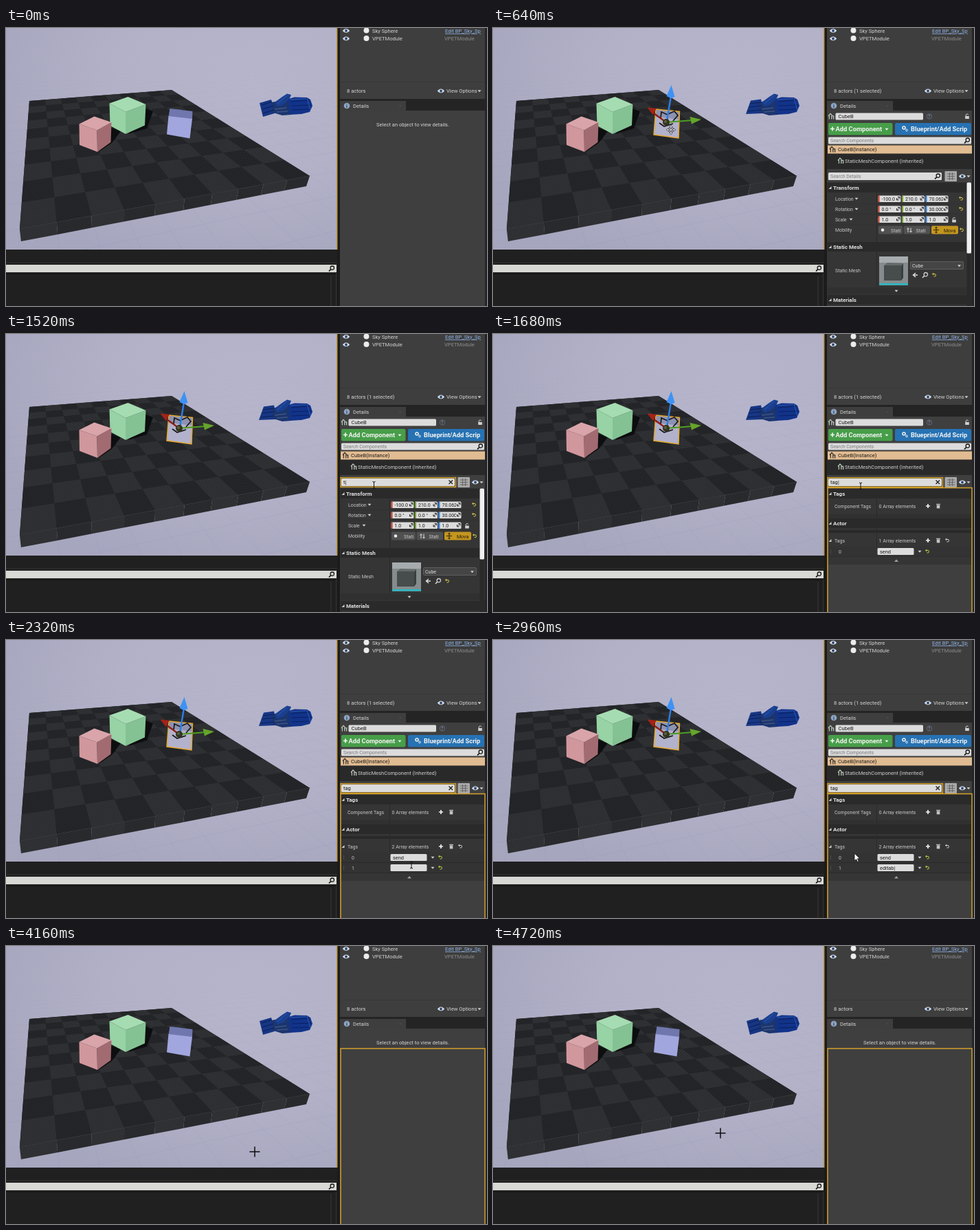
An HTML page for the animation above (4.8 s loop, 700x404 px).

```html
<!DOCTYPE html>
<html lang="en">
<head>
<meta charset="utf-8">
<title>Tagging a cube</title>
<style>
  html, body { margin: 0; width: 100%; height: 100%; overflow: hidden; background: #1e1e1e; }
  svg { display: block; width: 700px; height: 404px; }
  text { font: 7.6px Roboto, sans-serif; fill: #d4d4d4; white-space: pre; }
  .b { font-weight: 700; }
</style>
</head>
<body>
<svg id="stage" viewBox="0 0 700 404" xmlns="http://www.w3.org/2000/svg"></svg>
<script>
const LOOP = 4800, STEP = 80, SELECT = 640, FILTER = 1600, ADD = 2160, DESELECT = 4160;

// Markup helpers
const rect = (x, y, w, h, fill, more = '') => `<rect x="${x}" y="${y}" width="${w}" height="${h}" fill="${fill}" ${more}/>`;
const text = (x, y, s, fill = '#d4d4d4', size = 7.6, more = '') =>
  `<text x="${x}" y="${y}" style="fill:${fill};font-size:${size}px" ${more}>${s}</text>`;
const bold = (x, y, s, size = 8, fill = '#e2e2e2') => text(x, y, s, fill, size, 'class="b"');
const poly = (pts, fill, more = '') => `<polygon points="${pts}" fill="${fill}" ${more}/>`;
const path = (d, stroke, w = 1, fill = 'none') => `<path d="${d}" stroke="${stroke}" stroke-width="${w}" fill="${fill}"/>`;
const dot = (x, y, r, fill, more = '') => `<circle cx="${x}" cy="${y}" r="${r}" fill="${fill}" ${more}/>`;
const during = (from, to, s) => `<g data-from="${from}" data-to="${to}">${s}</g>`;
const at = (x, y, s) => `<g transform="translate(${x} ${y})">${s}</g>`;
const bySelection = (off, on) => during(0, SELECT, off) + during(SELECT, DESELECT, on) + during(DESELECT, LOOP, off);

// Small icons
const eye = (x, y) => at(x, y, path('M-5 0Q0-5.5 5 0Q0 5 -5 0Z', '#b9c6d8', .8, '#e4e8ee') + dot(0, 0, 1.9, '#2c4770'));
const lens = (x, y, c = '#161616') => at(x, y, dot(.8, -.8, 2.7, 'none', `stroke="${c}" stroke-width="1.3"`) + path('M-1.2 1.2L-4 4', c, 1.7));
const caret = (x, y, c = '#d0d0d0') => poly(`${x - 2.5},${y - 1.3} ${x + 2.5},${y - 1.3} ${x},${y + 1.7}`, c);
const undo = (x, y, c = '#d9c64a') => at(x, y, path('M-1.5-1.5H1Q2.5-1.5 2.5.2T1 2H-.5', c, 1) + poly('-3,-1.5 -.8,-3.4 -.8,.4', c));
const plus = (x, y) => path(`M${x - 3} ${y}h6M${x} ${y - 3}v6`, '#f2f2f2', 1.7);
const trash = (x, y) => rect(x - 2.3, y - 1.6, 4.6, 5, '#c4c4c4') + rect(x - 3, y - 3.2, 6, 1.1, '#c4c4c4');
const fold = (x, y) => poly(`${x + 4},${y - 4} ${x + 4},${y} ${x},${y}`, '#cfcfcf');
const house = (x, y, c = '#b9c7b9') => at(x, y, path('M-4-.5L-1-4L1.5-1.5M-2.6-1V4', c, 1.2) + path('M.8 4V-.6L3.6-.6V4', c, 1.3));
const lock = (x, y) => rect(x - 2.8, y - .5, 5.6, 4, '#d0d0d0') + path(`M${x - 1.8} ${y - .5}v-2q1.8-2.4 3.6 0`, '#d0d0d0', 1);
const field = (x, y, w, h) => rect(x, y, w, h, '#dcdcdc', 'rx="1.5"');

// Unit square to the floor's perspective
const project = (u, v) => {
  const w = 1 + .1347 * u - .5736 * v;
  return [(239.5 * u - 25.5 * v + 34) / w, (-3.9 * u + 18.5 * v + 106) / w].map(n => +n.toFixed(1));
};

function ground() {
  let d = '';
  for (let i = -20; i <= 30; i++) {
    const u = i / 10;
    d += `M${project(u, -1)}L${project(u, (.8 + .1347 * u) / .5736)}`;
  }
  for (let i = -10; i <= 16; i++) {
    const v = i / 10, near = Math.max(-2, (.5736 * v - .8) / .1347);
    d += `M${project(near, v)}L${project(3, v)}`;
  }
  return `<g mask="url(#fade)">${path(d, '#9498bd', .5)}</g>`;
}

function floor() {
  const n = 10, shade = odd => odd ? '#2b2c2f' : '#202124';
  let s = poly('34,106 241,90 442,215 20,292', '#26272a');
  for (let i = 0; i < n; i++) {
    for (let j = 0; j < n; j++) {
      const [a, b, c, d] = [i / n, (i + 1) / n, j / n, (j + 1) / n];
      s += poly([project(a, c), project(b, c), project(b, d), project(a, d)].join(' '), shade((i + j) % 2));
    }
    const drop = u => { const [x, y] = project(u, 1); return [x + 2 - 7 * u, y + 18 - 3 * u]; };
    const [a, b] = [i / n, (i + 1) / n];
    s += poly([project(a, 1), project(b, 1), drop(b), drop(a)].join(' '), i % 2 ? '#252629' : '#2c2d30');
  }
  return s + poly('34,106 241,90 442,215 437,230 22,310 20,292', 'url(#weave)') +
    path('M20 292L442 215', '#36373a', .7);
}

const cube = (top, left, right, [a, b, c]) => poly(left, b) + poly(right, c) + poly(top, a);

function cubes() {
  return poly('203,117 214,121 205,146 178,154', '#0c0d0e') + poly('153,145 167,150 154,167 135,180', '#0d0e0f') +
    cube('150.5,109.5 177.5,100 203.5,111 174,122', '150.5,109.5 174,122 174,154 151.5,142', '174,122 203.5,111 202,141.5 174,154',
      ['#a6dcb2', '#97d3a5', '#84c294']) +
    cube('106.5,139.5 128.5,128.5 153.5,137 132.5,148.5', '106.5,139.5 132.5,148.5 133,180 107,170', '132.5,148.5 153.5,137 152.5,166 133,180',
      ['#d9a5aa', '#d0979d', '#a26b72']);
}

function hand(cuff, ribs) {
  return poly(cuff, '#173684') +
    poly('386,108 398,106 413,103 415,126 402,127 389,123', '#1b356f') +
    poly('391,108 402,100 409,95.5 415,97 413,102 404,111 395,114', '#1a3f90') +
    poly('411,103 420,100.5 438,101 443,104 446,113 442,122 430,125 413,126', '#12338a') +
    path(ribs, '#0c2159', 1.2) +
    path('M415 107L441 105M416 113L444 112M416 119L441 118', '#0b2260', 1.2) +
    path('M414 104L437 102.5M395 110L409 98M438 102L443 119', '#2f59ab', 1) +
    path('M391 118L408 116M394 122L410 121', '#40547f', 1.3);
}
const restingHand = () => hand('369,109 386,104 391,124 374,129', 'M372 112L387 107M373 118L389 113M374 124L390 119');
const tiltedHand = () => hand('375,105.5 390,103.5 394,124 368,125', 'M374 110L390 108M372 115L391 113M370 121L391 119');

function gizmo() {
  return poly('237,118 271.5,121.5 270,160 234,155', '#b3b2cc') + poly('237,118 271.5,121.5 271,133 236,129', '#8e92b0') +
    poly('237,118 271.5,121.5 270,160 234,155', 'none', 'stroke="#e5a82c" stroke-width="1.5"') +
    path('M244 131L245 122L254 126V133M255 125L264 121L269 127L262 135M242 138L249 143L262 139', '#1a1a1c', 1.8) +
    path('M253 135L259 99', '#2b7fe8', 2.4) + poly('252.5,99 259.5,83 264.5,100 259,102', '#3d92f4') +
    path('M253 137L291 134', '#4f9a24', 2.2) + poly('286.5,129 303,133 289,139.5', '#65a52c') +
    path('M252 137L234 124', '#8f1c16', 2.2) + poly('224.5,115.5 238,117 232.5,126', '#a32319') +
    dot(252, 137, 5, '#33351f') + dot(251, 136, 2.2, '#5c5c3c');
}

const blueCube = () => poly('238.5,117 271.5,121 271,133 236.5,129', '#7077ae') + poly('236.5,128 271,132 267.5,160.5 234,154.5', '#a1a6de');

function viewport() {
  return `<g clip-path="url(#view)">` + rect(0, 0, 482, 322, 'url(#sky)') + ground() + floor() + cubes() +
    bySelection(blueCube() + restingHand(), gizmo() + tiltedHand()) + '</g>' +
    rect(481, 0, 1.7, 322, '#bf9537');
}

function browser() {
  return rect(0, 322, 482, 82, '#202020') + rect(0, 340, 482, 2, '#2a2a2a') + rect(0, 344, 481, 11, '#d8d8d5') + lens(474, 349.5) +
    rect(0, 357, 480, 1, '#151515') + rect(472.5, 360, 1, 44, '#383838') + rect(480, 357, 1, 47, '#343434');
}

function outliner() {
  return rect(482.7, 0, 3.3, 404, '#1b1b1b') + rect(486, 0, 211, 103, '#3e3e3e') + rect(697, 0, 3, 404, '#252525') +
    rect(486, 78, 211, 1, '#383838') +
    eye(495, 4) + eye(495, 15.5) + dot(524.5, 3.5, 4, '#ececec') + dot(524.5, 15, 4, '#ececec') +
    text(533, 7, 'Sky Sphere') + text(533, 18, 'VPETModule') + text(638, 18, 'VPETModule', '#8d8d8d') +
    `<g clip-path="url(#link)">${text(639, 7, 'Edit BP_Sky_Sp', '#8fb2e6', 7.6, 'text-decoration="underline"')}</g>` +
    bySelection(text(496, 94, '8 actors'), text(496, 94, '8 actors (1 selected)')) +
    eye(633, 91.5) + text(641, 94, 'View Options') + caret(689, 91.5) +
    rect(486, 103, 214, 17, '#242424') + rect(486, 106, 96, 14, '#3e3e3e') +
    dot(496, 113, 4.3, '#8fa6c4') + bold(495, 116, 'i', 7, '#1f3048') + text(505, 116, 'Details') + text(572, 115, '×', '#555', 6) +
    rect(486, 120, 211, 284, '#3f3f3f');
}

const hint = () => text(539, 143, 'Select an object to view details.');

function header(y, label) {
  return rect(487, y, 210, 14, '#2a2a2a') + fold(488.5, y + 9) + bold(495, y + 10, label);
}

function objectHead() {
  return house(492, 128.5) + field(498.5, 123.5, 127.5, 10) + text(502.5, 131, 'CubeB', '#1b1b1b') +
    dot(635, 128.5, 3.7, 'none', 'stroke="#5f6a80"') + text(633.2, 131, '?', '#8c9ab5', 6.5) + lock(690, 128.5) +
    rect(488, 138, 93.5, 17.5, '#479e49', 'rx="2"') + plus(494, 146.5) + bold(498.5, 150, 'Add Component', 9.3, '#f4f4f4') + caret(573, 147, '#f0f0f0') +
    rect(585, 138, 111, 17.5, '#2672b3', 'rx="2"') + dot(598, 145, 2, 'none', 'stroke="#eee" stroke-width="1.6"') +
    dot(602, 148.5, 1.4, 'none', 'stroke="#eee"') + bold(608, 150, 'Blueprint/Add Scrip', 9.3, '#f4f4f4') +
    field(488, 158.5, 208, 10) + text(491, 166, 'Search Components', '#7d7d7d', 7) + lens(690, 163.5) +
    rect(486, 170, 211, 35, '#292929') + rect(487, 170.5, 210, 12, '#e1bc92') + house(494, 176.5, '#33302c') +
    text(502, 179, 'CubeB(Instance)', '#1d1a16') + house(506, 193) + text(512, 196, 'StaticMeshComponent (Inherited)', '#cfcfcf') +
    rect(657.5, 208, 17.5, 15, '#a9a9a9', 'rx="1"') + path('M661 212h11M661 215.5h11M661 219h11M664.5 210v11M668.5 210v11', '#5a5a5a', .8) +
    eye(683, 215.5) + caret(692, 215.5) + field(488, 210, 165, 11);
}

function properties() {
  const rows = [['Location', 248, '-100.0', '210.0', '70.0625'], ['Rotation', 263, '0.0 °', '0.0 °', '30.000'], ['Scale', 278, '1.0', '1.0', '1.0']];
  const cells = rows.map(([name, y, ...vals]) =>
    text(498, y + 2.5, name, '#c9c9c9', 6.9) + caret(name === 'Scale' ? 521 : 529, y) +
    vals.map((v, i) => {
      const x = 560.5 + i * 34.5;
      return field(x, y - 4.5, 33, 9.5) + rect(x, y - 4.5, 2, 9.5, ['#c8402e', '#72a82e', '#2f7fd8'][i]) +
        text(x + 5, y + 2.6, v, '#1c1c1c', 7) + rect(x + 25.5, y - 4, 7, 8.5, '#dcdcdc') +
        path(`M${x + 27} ${y + 2}l4-4M${x + 27} ${y - 1}v3h3M${x + 28.5} ${y - 2.5}h3v3`, '#222', .9);
    }).join('')).join('');
  const button = (x, w, fill, label, ink) => rect(x, 287.5, w, 12, fill, 'rx="2"') + text(x + 18, 296.5, label, ink, 7);
  return rect(486, 224, 211, 180, '#353535') + header(225, 'Transform') + rect(558, 239, 1, 72, '#292929') + cells +
    path('M487 255.5h203M487 270.5h203M487 286h203', '#303030', .7) +
    undo(681, 248) + undo(681, 263) + lock(671, 279) + text(498, 296, 'Mobility', '#c9c9c9', 6.9) +
    button(561, 35, '#505050', 'Stati', '#c9c9c9') + button(597.5, 38.5, '#505050', 'Stati', '#c9c9c9') + button(638, 39, '#c4961f', 'Mova', '#241c08') +
    dot(567, 293.5, 2.3, '#eee') + path('M604 297v-6M608 290.5v6M602.5 292.5l1.5-2l1.5 2M606.5 295l1.5 2l1.5-2', '#ddd', 1) +
    path('M641 293.5h8M645 289.5v8M643.5 291l1.5-2l1.5 2M643.5 296l1.5 2l1.5-2', '#2c220a', 1) + undo(682, 293.5) +
    header(311, 'Static Mesh') + rect(558, 325, 1, 52, '#292929') + text(498, 354.5, 'Static Mesh', '#c9c9c9', 7) +
    rect(562, 332, 42, 42, '#868c8d') + rect(562, 332, 42, 9, '#a6acae') + poly('569,345 574,341 597,342 594,346', '#646a6a') +
    rect(569, 345, 25, 22, '#474d4d') + poly('594,346 597,342 597,363 594,367', '#393e3e') + rect(562, 371, 42, 2.5, '#27b9c4') +
    rect(607.5, 339.5, 77, 11, '#454545', 'rx="1.5" stroke="#686868" stroke-width=".8"') + text(610, 348, 'Cube', '#e4e4e4', 7) + caret(678.5, 345.5) +
    path('M618 359h-6M615 356l-3.5 3l3.5 3', '#ddd', 1.5) + lens(629, 359, '#ccc') + undo(642, 359) +
    rect(487, 377, 203, 10, '#303030') + caret(587, 382) + header(388, 'Materials') +
    rect(689.5, 225, 6.5, 179, '#2a2a2a') + rect(689.5, 224.5, 6.5, 103, '#f0f0f0', 'rx="1.5"');
}

function tagRow(y, index, id, value) {
  return rect(487, y - 7, 209, 15, '#333') + path(`M487 ${y + 7.5}h209`, '#282828', .7) + rect(491, y - 3, 1, 6, '#4b4b4b') +
    text(503, y + 2.7, index, '#c9c9c9', 7) + field(559.5, y - 5, 53, 10) + text(563, y + 2.7, value, '#1a1a1a', 7.4, id) +
    caret(621, y) + undo(632, y, '#b9c83c');
}

function tags() {
  const tools = y => plus(633, y) + trash(648, y);
  const folder = y => rect(487, y - 6, 209, 11, '#353535') + poly(`584,${y + 1.5} 590,${y + 1.5} 587,${y - 2}`, '#a0a0a0');
  const line = (x, y, s) => text(x, y, s, '#c9c9c9', 7);
  return rect(486, 224, 211, 180, '#3f3f3f') + rect(487, 224, 210, 111, '#353535') + header(225, 'Tags') +
    line(497, 252.5, 'Component Tags') + text(561.5, 252.5, '0 Array elements', '#c9c9c9', 7.2) + tools(250) + rect(487, 262, 210, 6, '#303030') +
    header(268, 'Actor') + rect(487, 285, 210, 4, '#292929') + rect(558, 225, 1, 109, '#2a2a2a') +
    fold(488.5, 302) + line(497, 302.5, 'Tags') + tools(300) + undo(661, 300, '#ccc') +
    tagRow(316, 0, '', 'send') +
    during(0, ADD, text(561.5, 302.5, '1 Array elements', '#c9c9c9', 7.2) + folder(329.5)) +
    during(ADD, LOOP, text(561.5, 302.5, '2 Array elements', '#c9c9c9', 7.2) + tagRow(331, 1, 'id="tag"', '') + folder(345));
}

function cursors() {
  const arms = 'M0-6.5L2.3-3.6H.8V-.8H3.6V-2.3L6.5 0L3.6 2.3V.8H.8V3.6H2.3L0 6.5L-2.3 3.6H-.8V.8H-3.6V2.3L-6.5 0L-3.6-2.3V-.8H-.8V-3.6H-2.3Z';
  const shapes = {
    cross: path('M-7.5 0h15M0-7.5v15', '#0c0c0c', 1.5),
    move: path(arms, '#111', .7, '#fff'),
    arrow: path('M0 0V11L2.6 8.6L4.4 12.4L6.2 11.5L4.4 7.8H8Z', '#111', .8, '#fff'),
    beam: path('M-2-5Q0-5 0-3.5Q0-5 2-5M0-4v8M-2 5Q0 5 0 3.5Q0 5 2 5', '#151515', 1)
  };
  return '<g id="cursor">' + Object.entries(shapes).map(([k, s]) => `<g data-kind="${k}">${s}</g>`).join('') + '</g>';
}

const defs = `<defs>
  <radialGradient id="sky" cx=".75" cy=".27" r=".85"><stop offset="0" stop-color="#b6b5cb"/><stop offset=".5" stop-color="#b2b1c8"/><stop offset="1" stop-color="#a6a6be"/></radialGradient>
  <linearGradient id="dim" x1="0" y1="0" x2="0" y2="1"><stop offset=".15" stop-color="#000"/><stop offset="1" stop-color="#888"/></linearGradient>
  <mask id="fade" maskUnits="userSpaceOnUse" x="0" y="0" width="482" height="322">${rect(0, 0, 482, 322, 'url(#dim)')}</mask>
  <pattern id="weave" width="4" height="4" patternUnits="userSpaceOnUse" patternTransform="skewY(-10)">${rect(0, 0, 2, 2, '#fff', 'opacity=".03"') + rect(2, 2, 2, 2, '#fff', 'opacity=".03"')}</pattern>
  <clipPath id="view">${rect(0, 0, 482, 322, '#fff')}</clipPath>
  <clipPath id="link">${rect(630, 0, 64, 20, '#fff')}</clipPath>
</defs>`;

const gold = (x, y, w, h) => rect(x, y, w, h, 'none', 'stroke="#d3a02a" stroke-width="1.5"');
const stage = document.getElementById('stage');
stage.innerHTML = defs + viewport() + browser() + outliner() +
  during(0, SELECT, hint()) +
  during(SELECT, DESELECT, objectHead() + during(0, FILTER, properties()) + during(FILTER, LOOP, tags() + gold(487, 223.5, 210, 190)) +
    during(0, 1360, lens(647, 215.5)) +
    during(1360, LOOP, gold(487, 208.8, 167.5, 13.5)) + during(1520, LOOP, path('M644.5 212.5l5.5 5.5M650 212.5l-5.5 5.5', '#222', 1.4)) +
    text(491, 218, '', '#1a1a1a', 7.6, 'id="search"')) +
  during(DESELECT, LOOP, hint() + gold(487, 149, 210, 265)) + cursors();

const track = [
  [80, 326, 262, 'cross'], [480, 268, 165, 'cross'], [560, 259, 148, 'move'], [800, 259, 148, 'move'],
  [880, 330, 153, 'arrow'], [1120, 535, 174, 'arrow'], [1200, 544, 176, 'beam'], [1360, 536, 218, 'beam'],
  [1680, 535, 221, 'beam'], [1760, 540, 226, 'arrow'], [2000, 631, 299, 'arrow'], [2160, 633, 300, 'arrow'],
  [2320, 590, 327, 'beam'], [2400, 575, 331, 'beam'], [2560, 572, 331, 'arrow'], [2720, 526, 310, 'arrow'],
  [3440, 526, 310, 'arrow'], [3680, 430, 312, 'cross'], [3920, 362, 299, 'cross'], [4160, 362, 299, 'cross'],
  [4720, 331, 272, 'cross']
];
const timed = [...stage.querySelectorAll('[data-from]')];
const kinds = [...stage.querySelectorAll('[data-kind]')];
const cursor = document.getElementById('cursor'), search = document.getElementById('search'), tag = document.getElementById('tag');
const show = (el, on) => el.setAttribute('display', on ? 'inline' : 'none');
const typed = (word, t, start) => word.slice(0, Math.max(0, Math.floor((t - start) / STEP) + 1));

function moveCursor(t) {
  const i = track.findLastIndex(k => k[0] <= t);
  show(cursor, i >= 0);
  if (i < 0) return;
  const [t0, x0, y0, kind] = track[i], [t1, x1, y1] = track[i + 1] || [LOOP, x0, y0];
  const p = (t - t0) / (t1 - t0);
  cursor.setAttribute('transform', `translate(${x0 + (x1 - x0) * p} ${y0 + (y1 - y0) * p})`);
  kinds.forEach(k => show(k, k.dataset.kind === kind));
}

function draw(t) {
  timed.forEach(el => show(el, t >= +el.dataset.from && t < +el.dataset.to));
  const query = typed('tag', t, 1520);
  search.textContent = t < 1360 ? 'Search Details' : query + (t < ADD ? '|' : '');
  search.style.fill = t < 1360 ? '#7d7d7d' : '#1a1a1a';
  search.style.fontSize = t < 1360 ? '7px' : '7.6px';
  tag.textContent = typed('editable', t, 2560) + (t >= 2400 && t < 3440 ? '|' : '');
  moveCursor(t);
}

let start;
function tick(now) {
  start ??= now;
  draw(Math.floor((now - start) % LOOP / STEP) * STEP);
  requestAnimationFrame(tick);
}
draw(0);
requestAnimationFrame(tick);
</script>
</body>
</html>
```
